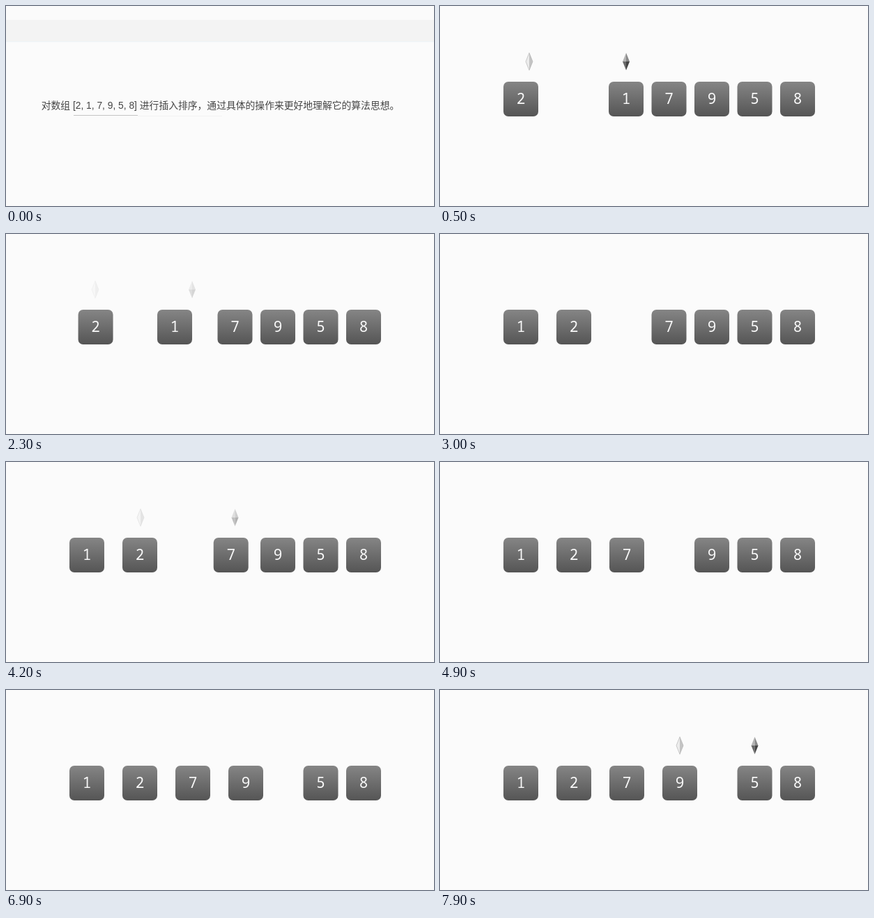
Write an HTML page that moves like this. It is 614 by 288 pixels and loops after 8000 ms.

```html
<!DOCTYPE html>
<html lang="zh-CN">
<head>
<meta charset="utf-8">
<title>插入排序</title>
<style>
  html, body { margin: 0; width: 100%; height: 100%; overflow: hidden; background: #fbfbfb; }
  svg { display: block; width: 614px; height: 288px; }
  .title { font: 13.8px "Liberation Sans", "Noto Sans CJK SC", "Noto Sans CJK", sans-serif; fill: #444; }
  .digit { font: 21px "Noto Sans Mono", "DejaVu Sans Mono", monospace; fill: #f8f8f8; text-anchor: middle; }
</style>
</head>
<body>
<svg viewBox="0 0 614 288">
  <defs>
    <linearGradient id="tileFill" x2="0" y2="1">
      <stop offset="0" stop-color="#858585"/>
      <stop offset=".5" stop-color="#6d6d6d"/>
      <stop offset="1" stop-color="#555"/>
    </linearGradient>
    <g id="light">
      <path d="M0 67.5L-5 80L0 92.5Z" fill="#ececec"/>
      <path d="M0 67.5L5 80L0 92.5Z" fill="#c4c4c4"/>
      <path d="M0 67.5L5 80L0 92.5L-5 80Z" fill="none" stroke="#aaa" stroke-width=".6"/>
    </g>
    <g id="dark">
      <path d="M0 67.5L-5 80H0Z" fill="#b4b4b4"/>
      <path d="M0 67.5L5 80H0Z" fill="#898989"/>
      <path d="M-5 80L0 92.5V80Z" fill="#6a6a6a"/>
      <path d="M5 80L0 92.5V80Z" fill="#444"/>
    </g>
  </defs>
  <rect width="614" height="288" fill="#fbfbfb"/>
  <g id="intro">
    <rect y="20" width="614" height="31" fill="#f3f3f3"/>
    <path d="M0 51.5H614" stroke="#eef5f9"/>
    <text class="title" x="50.7" y="148">对数组 [2, 1, 7, 9, 5, 8] 进行插入排序，通过具体的操作来更好地理解它的算法思想。</text>
    <path d="M97 157.5H189" stroke="#c4c4c4"/>
    <path d="M189 158.5H310" stroke="#f3f3f3"/>
  </g>
  <g id="sorting">
    <g id="tiles"></g>
    <g id="pointers"><use id="sorted" href="#light"/><use id="next" href="#dark"/></g>
  </g>
</svg>
<script>
const LOOP = 8000, STEP = 100;
const FIRST_MOVE = 2100, PERIOD = 1950, MOVE = 750;
const values = [2, 1, 7, 9, 5, 8];
const sortedPointerX = [128, 193, 268, 344];
const byId = id => document.getElementById(id);
const slotX = i => 116 + 76 * i;
const queueX = i => 267 + 61.5 * (i - 1);
const clamp = v => Math.max(0, Math.min(1, v));
const ramp = (t, start, length) => clamp((t - start) / length);
const ease = u => (1 - Math.cos(Math.PI * u)) / 2;
const mix = (a, b, u) => a + (b - a) * u;
const place = (node, x) => node.setAttribute('transform', `translate(${x.toFixed(2)} 0)`);
const fade = (node, opacity) => node.setAttribute('opacity', opacity.toFixed(3));

byId('tiles').innerHTML = values.map(v => `<g>
  <rect x="-25" y="109" width="50" height="50" rx="7" fill="url(#tileFill)"/>
  <text class="digit" y="141">${v}</text></g>`).join('');
const tiles = [...byId('tiles').children];
byId('tiles').append(tiles[1]); // the inserted tile passes over its neighbour

const moveStart = round => FIRST_MOVE + round * PERIOD;
const moved = (t, round) => ease(ramp(t, moveStart(round), MOVE));

function tileX(i, t) {
  if (i === 0) return mix(slotX(0), slotX(1), moved(t, 0));
  const target = i === 1 ? 0 : i;
  return mix(queueX(i), slotX(target), moved(t, i - 1));
}

function render(t) {
  fade(byId('intro'), 1 - ramp(t, 0, 300));
  fade(byId('sorting'), ramp(t, 0, 300));
  tiles.forEach((tile, i) => place(tile, tileX(i, t)));

  const fadeOut = 250;
  const round = Math.max(0, Math.ceil((t - FIRST_MOVE - fadeOut) / PERIOD));
  const start = moveStart(round);
  const shownAt = round ? start - 800 : 200;
  place(byId('sorted'), sortedPointerX[round]);
  place(byId('next'), queueX(round + 1));
  fade(byId('pointers'), ramp(t, shownAt, 200) * (1 - ramp(t, start, fadeOut)));
}

const origin = performance.now();
function tick(now) {
  const elapsed = Math.max(0, now - origin) % LOOP;
  render(Math.floor(elapsed / STEP) * STEP);
  requestAnimationFrame(tick);
}
render(0);
requestAnimationFrame(tick);
</script>
</body>
</html>
```
